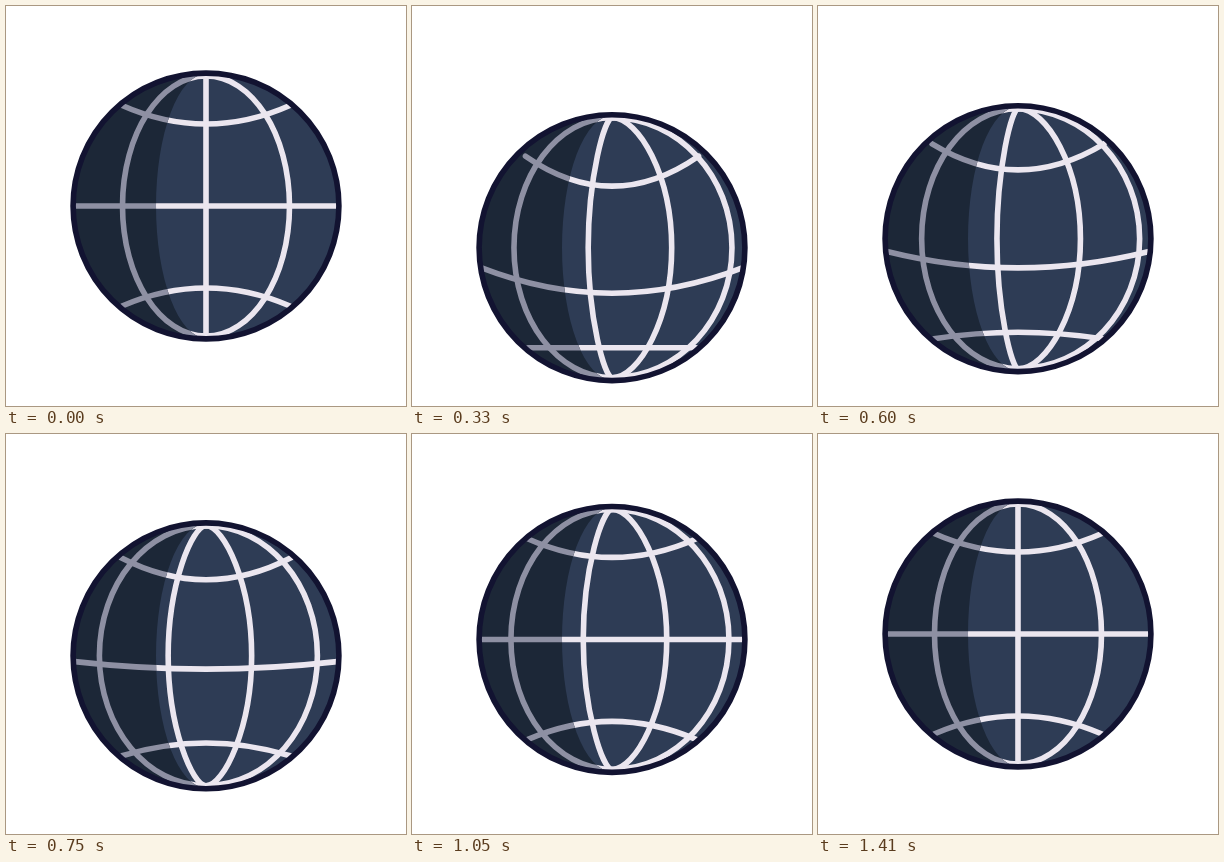
Animation, 400 px wide and 400 px high, one loop 9470 ms. Source, as an HTML page with a canvas:

```html
<!DOCTYPE html>
<html lang="en">
<head>
<meta charset="utf-8">
<title>Spinning globe</title>
<style>
html, body { margin: 0; width: 100%; height: 100%; overflow: hidden; background: #fff; }
canvas { display: block; width: 100vmin; height: 100vmin; }
</style>
</head>
<body>
<canvas id="stage" width="400" height="400"></canvas>
<script>
const ctx = document.getElementById('stage').getContext('2d');
const LOOP = 9470, STEP = 30, DIP = 330, LEVEL = 990, STILL = 1350, END = 1410;
const R = 130;
const INK = '#121331';
const LIT = { fill: '#2e3c55', line: '#ebe6ef' };
const DIM = { fill: '#1c2737', line: '#8e90a3' };

const clamp = v => Math.min(1, Math.max(0, v));
const span = (t, a, b) => clamp((t - a) / (b - a));
const mix = (a, b, k) => a + (b - a) * k;

// Cubic easing through (0,0) and (1,1), solved by bisection.
function bezier(x1, y1, x2, y2) {
  const at = (s, a, b) => 3 * s * (1 - s) * (1 - s) * a + 3 * s * s * (1 - s) * b + s * s * s;
  return x => {
    if (x <= 0 || x >= 1) return clamp(x);
    let lo = 0, hi = 1;
    for (let i = 0; i < 24; i++) {
      const mid = (lo + hi) / 2;
      if (at(mid, x1, x2) < x) lo = mid; else hi = mid;
    }
    return at(lo, y1, y2);
  };
}

const press = bezier(.333, .333, .667, 1);
const bow = bezier(.333, .165, .667, 1);
const rise = bezier(.333, 0, .403, 1);
const whirl = bezier(.212, 0, .455, 1);
const cosine = k => (1 - Math.cos(Math.PI * k)) / 2;

function pose(t) {
  if (t < DIP) {
    const k = span(t, 0, DIP);
    return { y: 41.7 * press(k), bend: bow(k), turn: -.285 * press(k) };
  }
  return {
    y: 41.7 * (1 - rise(span(t, DIP, END))),
    bend: 1 - cosine(span(t, DIP, LEVEL)),
    turn: mix(-.285, 3, whirl(span(t, DIP, STILL)))
  };
}

// Horizontal reach of a meridian that stands p steps from the centre.
function reach(p) {
  const a = Math.abs(p);
  return Math.sign(p) * (a < 1 ? 83.5 * a : 83.5 + 51 * (a - 1));
}

// Half ellipse whose poles sharpen as it nears the centre.
function meridian(p) {
  const x = reach(p), side = .552 * R;
  const pole = x * mix(.2, .552, Math.min(1, Math.abs(p)));
  ctx.beginPath();
  ctx.moveTo(0, -R);
  ctx.bezierCurveTo(pole, -R, x, -side, x, 0);
  ctx.bezierCurveTo(x, side, pole, R, 0, R);
  ctx.stroke();
}

function parallel(halfWidth, ends, middle) {
  ctx.beginPath();
  ctx.moveTo(-halfWidth, ends);
  ctx.quadraticCurveTo(0, 2 * middle - ends, halfWidth, ends);
  ctx.stroke();
}

// Fills the current path and draws the grid inside it.
function paint({ fill, line }, bend, turn) {
  ctx.save();
  ctx.fillStyle = fill;
  ctx.fill();
  ctx.clip();
  ctx.strokeStyle = line;
  ctx.lineWidth = 5.6;
  ctx.lineCap = ctx.lineJoin = 'round';
  const shift = turn - Math.round(turn);
  for (let k = -2; k <= 2; k++) {
    const p = k + shift;
    if (Math.abs(p) < 1.98) meridian(p);
  }
  parallel(mix(85, 86.5, bend), mix(-101, -91.5, bend), mix(-82, -61.5, bend));
  parallel(131, 20 * bend, 45.5 * bend);
  parallel(84, 100, mix(82, 100, bend));
  ctx.restore();
}

function disc(r) {
  ctx.beginPath();
  ctx.arc(0, 0, r, 0, 2 * Math.PI);
}

// Area between the left rim and a narrower ellipse.
function crescent() {
  ctx.beginPath();
  ctx.arc(0, 0, 132, -Math.PI / 2, Math.PI / 2, true);
  ctx.ellipse(0, 0, 50, 132, 0, Math.PI / 2, Math.PI * 1.5);
}

function draw(t) {
  const { y, bend, turn } = pose(t);
  ctx.fillStyle = '#fff';
  ctx.fillRect(0, 0, 400, 400);
  ctx.save();
  ctx.translate(200, 200 + y);

  disc(132);
  paint(LIT, bend, turn);
  crescent();
  paint(DIM, bend, turn);

  disc(132.9);
  ctx.strokeStyle = INK;
  ctx.lineWidth = 5.6;
  ctx.stroke();
  ctx.restore();
}

const start = performance.now();
function tick() {
  const t = (performance.now() - start) % LOOP;
  draw(Math.min(END, Math.floor(t / STEP) * STEP));
  requestAnimationFrame(tick);
}
tick();
</script>
</body>
</html>
```
